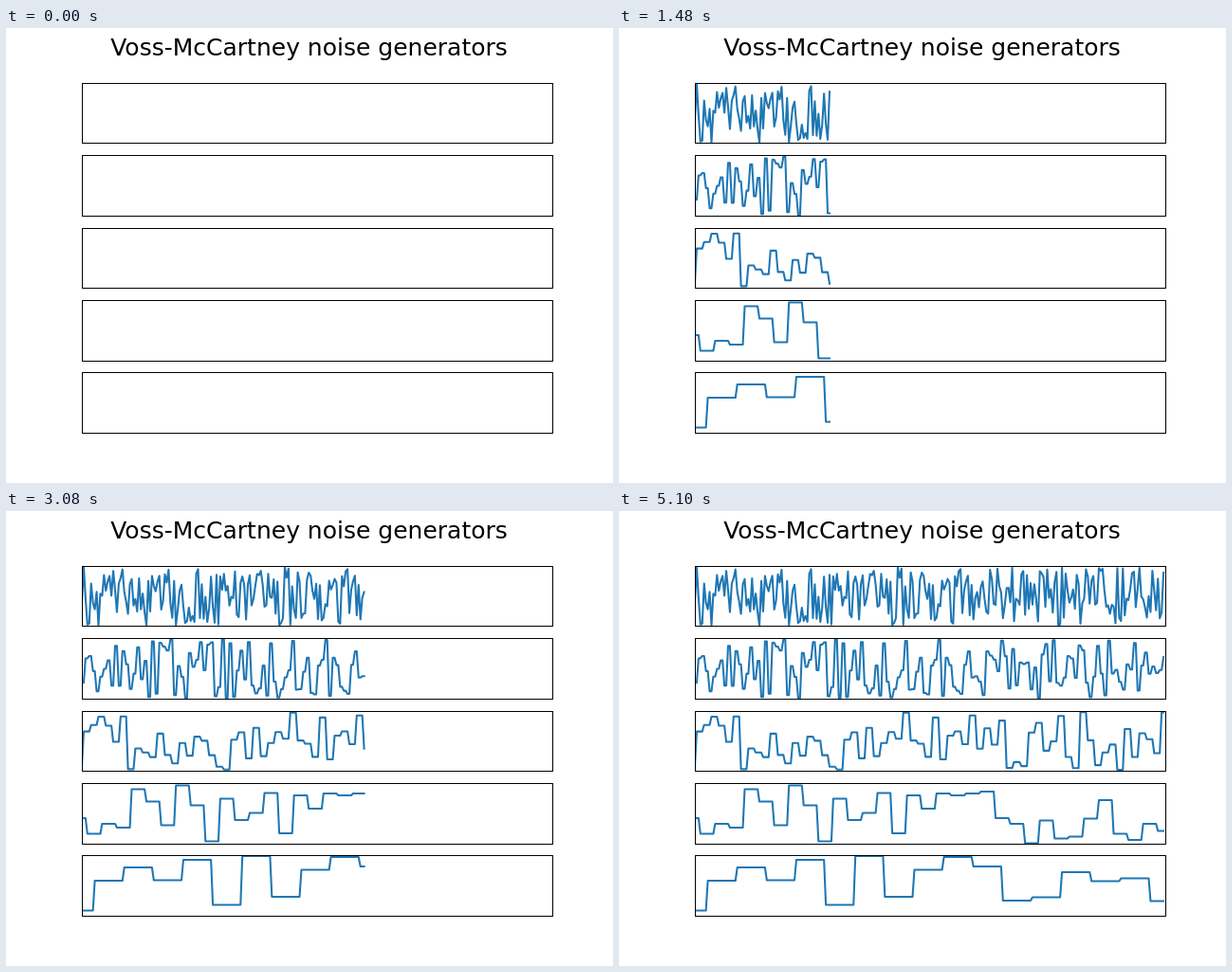
Recreate the animation shown at these times as an HTML page. Size 640 by 480 pixels, loop 5120 ms.

```html
<!DOCTYPE html>
<html lang="en">
<head>
<meta charset="utf-8">
<title>Voss-McCartney noise generators</title>
<style>
  html, body { margin: 0; width: 100%; height: 100%; overflow: hidden; background: #fff; }
  svg { display: block; width: 640px; height: 480px; }
  text { font: 25px "DejaVu Sans", Verdana, sans-serif; text-anchor: middle; }
  polyline { fill: none; stroke: #1f77b4; stroke-width: 2.08; stroke-linejoin: round; stroke-linecap: square; }
  .box { fill: none; stroke: #000; stroke-width: 1; }
</style>
</head>
<body>
<svg viewBox="0 0 640 480">
  <text x="319.5" y="29">Voss-McCartney noise generators</text>
</svg>
<script>
const NS = "http://www.w3.org/2000/svg";
const svg = document.querySelector("svg");
const LOOP = 5120, TICK = 20, COUNT = 255;
const LEFT = 80, WIDTH = 496, STEP = WIDTH / COUNT;

// Heights of the long, clearly visible steps of the two slowest generators.
const slow = [
  324, 340.5, 330, 334, 293.5, 306.5, 331.5, 289.5, 310.5, 348.5, 303.5,
  326, 318.5, 297.5, 340, 300, 314, 298, 300, 298, 296, 324,
  330, 350.5, 326.5, 345.5, 343.5, 324.5, 305, 340.5, 347, 330, 337.5
];
const slowest = [
  421.5, 390, 376, 389.5, 368, 415.5, 364, 407, 378.5,
  365, 375, 411, 407.5, 381, 390.5, 387.5, 411.5
];

function randomFrom(seed) {
  return () => {
    seed = (seed + 0x6d2b79f5) | 0;
    let t = Math.imul(seed ^ (seed >>> 15), 1 | seed);
    t = (t + Math.imul(t ^ (t >>> 7), 61 | t)) ^ t;
    return ((t ^ (t >>> 14)) >>> 0) / 2 ** 32;
  };
}

// Uniform levels spanning one box.
function uniform(top, bottom, seed) {
  const rand = randomFrom(seed);
  return Array.from({ length: COUNT }, () => top + 1 + rand() * (bottom - top - 1));
}

function add(name, attrs, parent = svg) {
  const node = document.createElementNS(NS, name);
  for (const key in attrs) node.setAttribute(key, attrs[key]);
  return parent.appendChild(node);
}

// A generator holds each level for one period; shift sets where the first change falls.
function makeRow({ top, bottom, period, shift, levels = uniform(top, bottom, period) }) {
  const id = "clip" + period;
  const box = { x: LEFT + 0.5, y: top + 0.5, width: WIDTH, height: bottom - top };
  add("rect", box, add("clipPath", { id }));
  const line = add("polyline", { "clip-path": `url(#${id})` });
  add("rect", { ...box, class: "box" });
  const points = Array.from({ length: COUNT }, (_, i) => {
    const y = levels[Math.floor((i + shift) / period)];
    return `${(LEFT + i * STEP).toFixed(2)},${y.toFixed(2)}`;
  });
  return { line, points };
}

const rows = [
  { top: 58, bottom: 121, period: 1, shift: 0 },
  { top: 134, bottom: 198, period: 2, shift: 0 },
  { top: 211, bottom: 274, period: 4, shift: 3 },
  { top: 287, bottom: 351, period: 8, shift: 5, levels: slow },
  { top: 363, bottom: 427, period: 16, shift: 9, levels: slowest }
].map(makeRow);

const start = performance.now();
let shown = -1;

function draw() {
  const time = (performance.now() - start) % LOOP;
  const last = Math.min(COUNT - 1, Math.max(0, Math.floor(time / TICK) - 1));
  if (last !== shown) {
    shown = last;
    for (const { line, points } of rows)
      line.setAttribute("points", last ? points.slice(0, last + 1).join(" ") : "");
  }
  requestAnimationFrame(draw);
}
draw();
</script>
</body>
</html>
```
